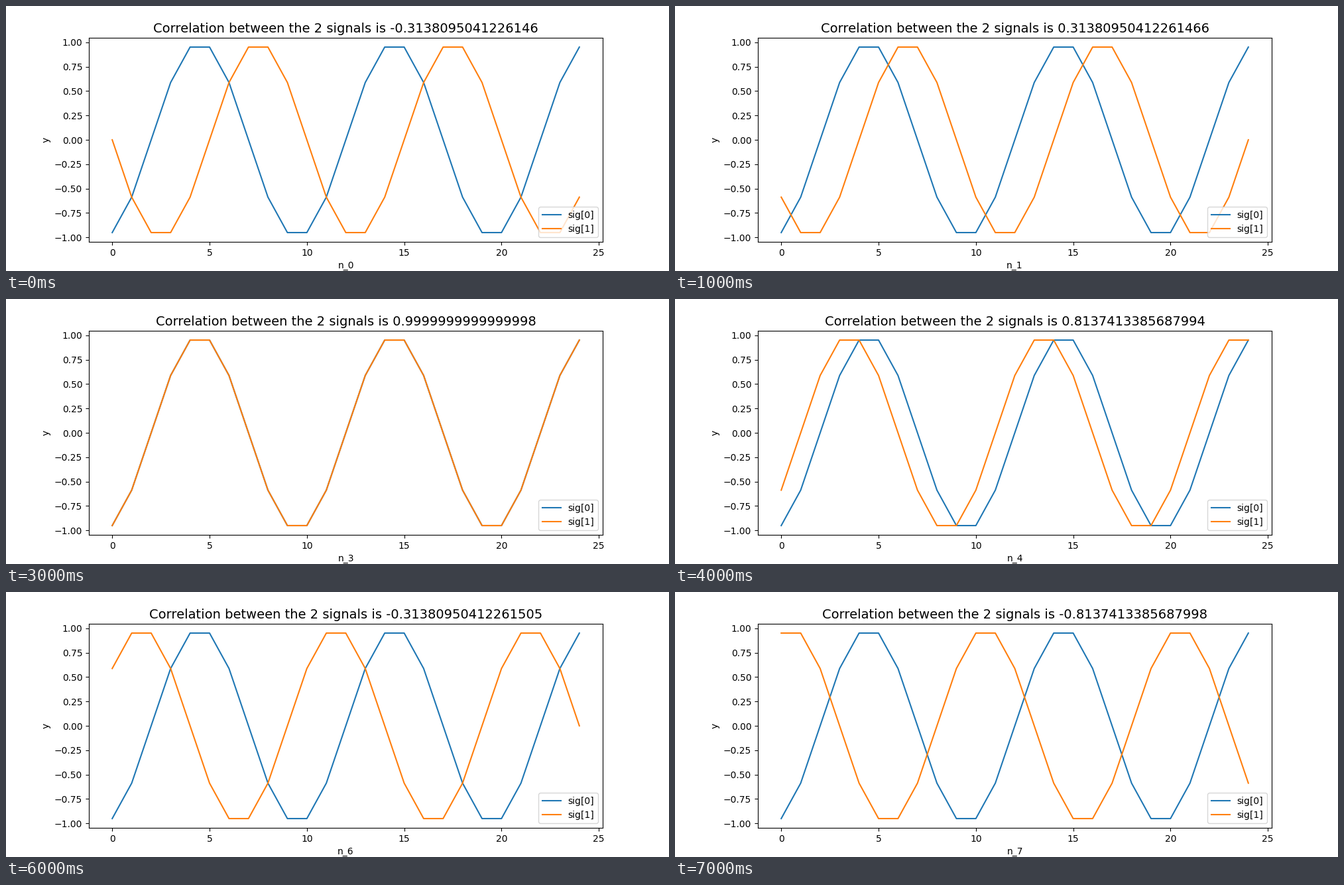
These frames come from a looping animation (1000x400 px, 8 s). A matplotlib script:

```python
import numpy as np
import matplotlib.pyplot as plt
from matplotlib.animation import FuncAnimation

PERIOD = 10
CORRELATIONS = [
    "-0.3138095041226146",
    "0.31380950412261466",
    "0.8137413385687998",
    "0.9999999999999998",
    "0.8137413385687994",
    "0.31380950412261466",
    "-0.31380950412261505",
    "-0.8137413385687998",
]

n = np.arange(25)


def wave(start):
    """Sine sampled at n, crossing zero upwards at n == start."""
    return np.sin(2 * np.pi * (n - start) / PERIOD)


fig, ax = plt.subplots(figsize=(10, 4), dpi=100)
ax.plot(n, wave(2), label="sig[0]")
shifted, = ax.plot(n, wave(5), label="sig[1]")
title = ax.set_title("", fontsize=14)
ax.set_ylabel("y")
ax.legend(loc="lower right")


def update(step):
    shifted.set_ydata(wave(5 - step))
    title.set_text(f"Correlation between the 2 signals is {CORRELATIONS[step]}")
    ax.set_xlabel(f"n_{step}")
    return shifted, title


anim = FuncAnimation(fig, update, frames=len(CORRELATIONS), interval=1000,
                     repeat=True, repeat_delay=0)
plt.show()
```
